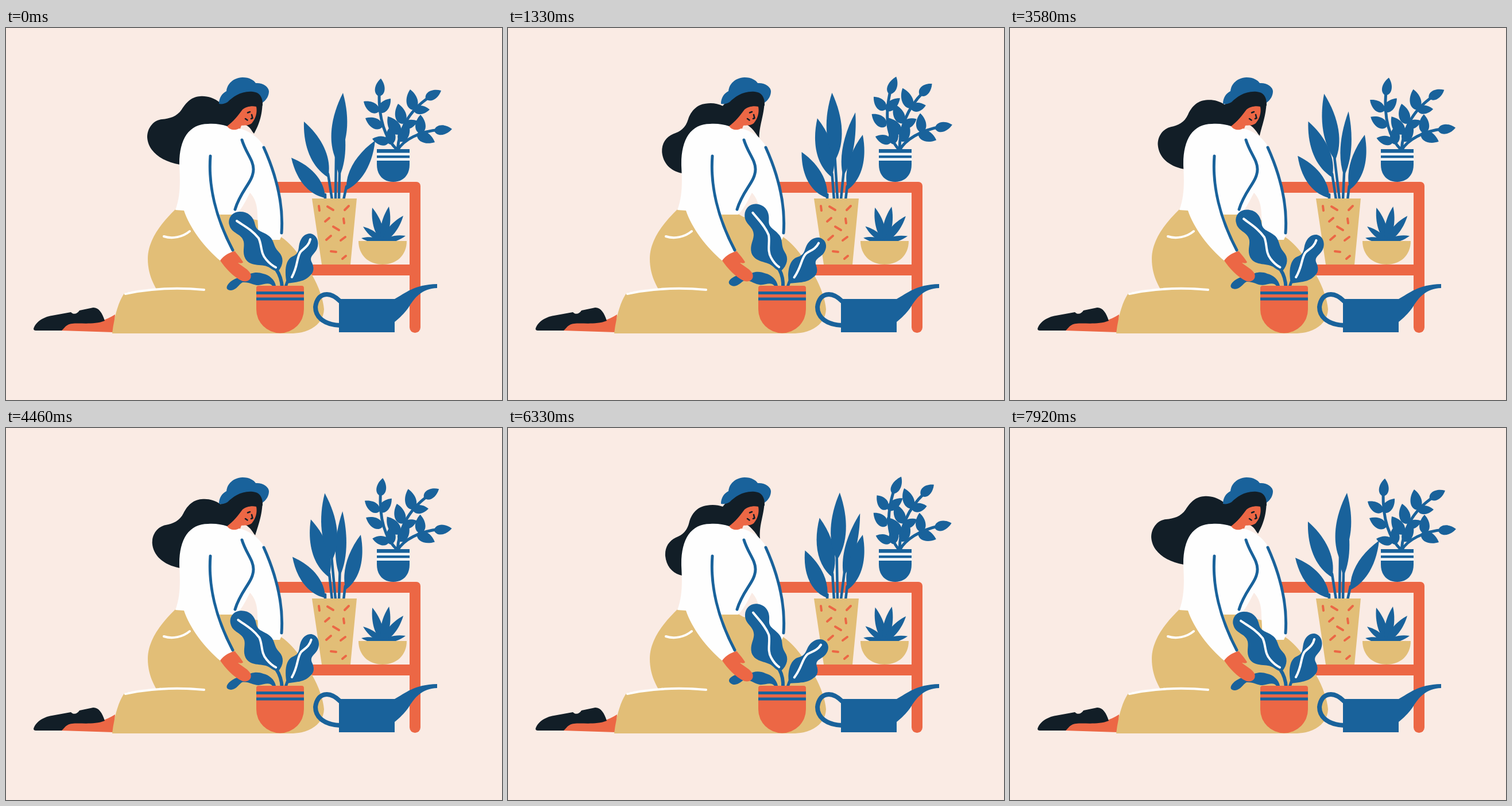
Animation, 864 px wide and 648 px high, one loop 7960 ms. Source, as an HTML page:

```html
<!DOCTYPE html>
<html lang="en">
<head>
<meta charset="utf-8">
<title>Gardener</title>
<style>
  html, body { margin: 0; width: 100%; height: 100%; overflow: hidden; background: #faebe4; }
  svg { display: block; width: 100vw; height: 100vh; }
  .blue { fill: #19629b; }
  .dark { fill: #121e27; }
  .red { fill: #ec6745; }
  .tan { fill: #e2be77; }
  .white { fill: #fefefe; }
  .line { fill: none; stroke-linecap: round; stroke-linejoin: round; }
  .line.blue { stroke: #19629b; }
  .line.white { stroke: #fefefe; }
  .line.red { stroke: #ec6745; }
  .line.dark { stroke: #121e27; }
</style>
</head>
<body>
<svg viewBox="0 0 864 648">
  <!-- shelf -->
  <g class="red">
    <rect x="460" y="268" width="262" height="19" rx="7"/>
    <rect x="500" y="412" width="212" height="19"/>
    <path d="M703 275 H722 V521.5 A9.5 9.5 0 0 1 703 521.5Z"/>
  </g>

  <!-- head -->
  <path id="hair" class="dark"/>
  <path id="lock" class="dark"/>
  <path class="red" d="M384 172 C396 163 404 153 412 142 C418 137 428 135 436 137 C438 147 435 158 428 166 C422 171 414 169 410 170 C408 174 408 178 404 181 H388Z"/>
  <path class="line dark" stroke-width="2.6" d="M421 147.5 L425 146 M428 151 L429.5 157 L427 158 M417 158 L420.5 160.5"/>
  <path class="blue" d="M371 132 C371 122 376 114 384 110 C385 98 395 87 412 86 C424 86 432 91 435 96 C446 95 457 101 458 110 C458 118 454 125 447 130 C446 119 441 112 430 111 C410 109 395 120 386 129 C381 132 376 133 371 132Z"/>

  <!-- legs and skirt -->
  <path class="red" d="M96 527 C102 514 115 512 130 513 C150 515 170 512 190 499 L188 530Z"/>
  <path class="dark" d="M48 524 C51 512 66 503 80 501 L113 495 C118 500 124 498 128 492 L152 487 C162 487 168 497 172 510 C150 519 118 511 108 517 C102 520 100 525 97 527 H52 Q48 527 48 524Z"/>
  <path class="tan" d="M295 316 C270 340 247 370 247 402 C247 425 255 443 262 455 C240 457 222 459 207 461 C196 475 188 505 185 532 H500 C530 531 553 515 554 490 C553 475 545 450 533 430 C515 400 498 375 476 362 L440 335 L410 329 L401 324 L310 316Z"/>
  <path class="line white" stroke-width="4" d="M275 363 C290 368 308 364 320 354 M208 463 C250 454 300 452 345 456"/>

  <!-- blouse -->
  <path class="white" d="M295 317 C305 290 303 262 302 240 C301 195 318 167 352 167 C364 166 376 168 385 171 C390 178 399 179 406 175 C424 179 440 190 450 207 C468 245 481 295 481 320 V360 L477 369 H440 L438 326 C438 308 433 295 425 287 C418 300 413 312 401 325 H372 C378 350 386 370 396 388 L374 406 C345 382 320 348 310 318Z"/>
  <path class="line blue" stroke-width="5" d="M356 223 C352 275 366 332 395 387 M411 195 C418 218 431 230 431 246 C431 268 409 282 399 316 M449 208 C467 248 484 302 480 357"/>

  <!-- shelf plants -->
  <g id="shelfPlants"></g>
  <path class="tan" d="M533 297 H611 L600 412 H550Z"/>
  <path class="line red" stroke-width="4" d="M545 310 l1 8 M560 311 l10 6 M590 317 l7 -7 M556 337 l7 -6 M570 346 l10 6 M588 332 l1 8 M558 369 l8 -7 M583 370 l8 -6 M566 389 l9 1 M586 402 l6 -5"/>
  <path class="tan" d="M614 371 H698 C698 396 680 412 656 412 C632 412 614 396 614 371Z"/>
  <path class="blue" d="M646 211 H703 V238 C703 256 692 268 674.5 268 C657 268 646 256 646 238Z"/>
  <path class="white" d="M646 217.5 h57 v4.5 h-57Z m0 9 h57 v4.5 h-57Z"/>

  <!-- watering can -->
  <path class="blue" d="M580 472 H677 C696 462 710 447 751 446 V453 C724 454 712 470 703 484 C696 495 688 503 677 512 V530 H580Z"/>
  <path class="line blue" stroke-width="8" d="M582 476 C563 457 542 461 539 486 C539 505 556 517 582 518"/>

  <!-- floor plant -->
  <g id="floorPlant"></g>
  <path class="red" d="M373 405 C380 396 390 390 399 389 C402 394 408 399 413 408 C411 411 406 409 404 409 C412 416 422 420 426 428 C429 437 422 443 412 441 C396 434 382 418 373 405Z"/>
  <path class="red" d="M440 449 H515 Q519 449 519 453 V490 A41.5 41.5 0 0 1 436 490 V453 Q436 449 440 449Z"/>
  <path class="blue" d="M436 459 h83 v5 h-83Z m0 10.5 h83 v5 h-83Z"/>
</svg>
<script>
const LOOP = 7960, STEP = 1000 / 24;
const $ = id => document.getElementById(id);

// Swings from pose 0 through the given turning points and back, easing at each
const swing = (...turns) => t => {
  const stops = [[0, 0], ...turns, [LOOP, 0]];
  const i = stops.findIndex(([at]) => at > t);
  const [t0, v0] = stops[i - 1], [t1, v1] = stops[i];
  return v0 + (v1 - v0) * (1 - Math.cos(Math.PI * (t - t0) / (t1 - t0))) / 2;
};

const breeze = swing([2050, 1], [4150, .06], [6350, 1]);
const hairSwing = swing([2000, 1.06], [4170, .28], [6330, 1]);
const twigSwing = swing([1500, 1.05], [3900, .05], [5900, .95]);
const broadSwing = swing([1550, 1.02], [4250, .08], [6400, 1]);
const leftSwing = swing([2300, 1], [3700, 0], [5500, 1]);
const tallSwing = swing([2600, 1]);
const rightSwing = swing([1300, 1], [6350, 1]);

const mix = (a, b, p) => {
  const to = b.match(/[\d.]+/g);
  let i = 0;
  return a.replace(/[\d.]+/g, v => (+v + (to[i++] - v) * p).toFixed(2));
};

// Rotates path points about a root, more strongly towards the far end
function bend(d, [rx, ry], reach, deg, power) {
  return d.replace(/(-?[\d.]+) (-?[\d.]+)/g, (_, px, py) => {
    const x = px - rx, y = py - ry;
    const a = deg * Math.PI / 180 * Math.min(1.15, (Math.hypot(x, y) / reach) ** power);
    const c = Math.cos(a), s = Math.sin(a);
    return (rx + x * c - y * s).toFixed(2) + ' ' + (ry + x * s + y * c).toFixed(2);
  });
}

// Pointed leaf from base to tip; low shapes how quickly it widens
function leaf(bx, by, tx, ty, wide = .36, low = .1) {
  const ux = tx - bx, uy = ty - by;
  const at = (f, side) => (bx + ux * f - uy * wide * side).toFixed(1) + ' ' + (by + uy * f + ux * wide * side).toFixed(1);
  return `M${bx} ${by} C${at(low, 1)} ${at(.62, 1)} ${tx} ${ty} C${at(.62, -1)} ${at(low, -1)} ${bx} ${by}Z`;
}

const movers = [];
function add(parent, move, d, cls, width) {
  const el = document.createElementNS('http://www.w3.org/2000/svg', 'path');
  el.setAttribute('class', cls);
  if (width) el.setAttribute('stroke-width', width);
  $(parent).append(el);
  movers.push({ power: .7, ...move, el, d });
}

// Sword leaves in the tall pot
function sword(by, turn, foot, [bx, by0], [tx, ty], wide) {
  const root = [foot, 297];
  const move = { by, turn, root, reach: Math.hypot(tx - foot, ty - 297), power: .5 };
  add('shelfPlants', move, leaf(bx, by0, tx, ty, wide, .25), 'blue');
  add('shelfPlants', move, `M${bx} ${by0 - 6} L${foot} 299`, 'line blue', 4.5);
}
sword(breeze, 15, 556, [556, 296], [497, 226], .2);
sword(leftSwing, 13.3, 568, [561, 260], [519, 163], .18);
sword(breeze, 11.5, 580, [581, 258], [583, 145], .11);
sword(rightSwing, -13.5, 588, [593, 282], [643, 196], .17);
sword(tallSwing, -13.5, 574, [575, 230], [587, 113], .15);

// Branches: stem plus leaves given as base and tip
function branch(by, turn, reach, stem, leaves) {
  const move = { by, turn, reach, root: [682, 211] };
  add('shelfPlants', move, leaves.map(l => leaf(...l)).join(''), 'blue');
  add('shelfPlants', move, stem, 'line blue', 5);
}
branch(breeze, 14.6, 126, 'M682 213 C660 192 649 160 650 112', [
  [650, 119, 653, 88], [649, 146, 623, 128], [650, 147, 670, 123],
  [655, 173, 626, 157], [667, 199, 638, 193], [670, 203, 670, 171]]);
branch(twigSwing, -10.1, 127, 'M682 213 C684 180 700 145 738 120', [
  [731, 123, 758, 109], [710, 143, 704, 107], [710, 143, 738, 142],
  [691, 167, 683, 132], [685, 185, 665, 154], [691, 172, 717, 162], [686, 198, 702, 168]]);
branch(breeze, -6.2, 99, 'M682 213 C692 195 720 180 756 177', [
  [746, 179, 777, 176], [722, 184, 722, 151], [716, 184, 747, 199]]);

// Succulent
for (const [x, y] of [[638, 313], [667, 311], [692, 327], [622, 346], [696, 362], [619, 366]])
  add('shelfPlants', { by: breeze, turn: 1.5, root: [656, 371], reach: 55 }, leaf(656, 372, x, y, .16, .2), 'blue');

// Floor plant
const held = { by: breeze, turn: 9, root: [466, 449], reach: 81, power: 1.5 };
const small = { by: breeze, turn: 12, root: [489, 449], reach: 98, power: .8 };
const big = { by: broadSwing, turn: 13.5, root: [476, 435], reach: 125, power: .35 };

add('floorPlant', held, 'M470 449 C468 438 458 430 448 428 C438 424 425 426 420 432 C410 432 396 436 388 445 C382 452 384 457 392 457 C402 456 406 446 412 443 C424 442 430 448 440 448 C450 447 458 442 464 449Z', 'blue');
add('floorPlant', small, 'M489 445 C485 425 486 404 499 398 C511 393 509 385 511 376 C514 364 521 358 530 358 C542 360 546 373 542 384 C538 394 528 397 532 407 C537 416 537 425 530 431 C520 442 508 442 489 445Z', 'blue');
add('floorPlant', small, 'M490 442 L487 451', 'line blue', 5);
add('floorPlant', small, 'M530 368 C527 381 518 384 513 390 C506 400 509 414 498 434', 'line white', 4);
add('floorPlant', big, 'M474 424 C484 412 484 399 475 390 C465 380 468 371 459 363 C448 354 437 355 434 343 C431 327 420 319 406 320 C393 321 386 332 389 343 C393 359 410 357 414 372 C416 382 411 390 417 402 C427 418 448 409 460 418 C466 422 470 424 474 424Z', 'blue');
add('floorPlant', big, 'M471 421 Q480 434 481 452', 'line blue', 6);
add('floorPlant', big, 'M402 336 C415 345 428 351 440 366 C446 378 443 392 453 403 C458 409 464 414 470 417', 'line white', 4);

const crown = 'L340 215 L395 182 L420 145 L447 135 L445 112 L400 105Z';
const hair = [
  'M374 131 C362 121 349 118 338 119 C322 120 313 131 306 142 C298 154 285 158 272 159 C258 160 246 173 246 190 C247 213 268 232 303 238' + crown,
  'M374 137 C366 134 356 133 346 135 C330 137 320 149 316 163 C312 180 304 186 292 191 C280 197 273 208 274 223 C276 241 286 253 303 257' + crown
];
const lock = [
  'M436 125 L447 122 C447 150 442 166 432 184 C428 180 426 172 416 168Z',
  'M436 125 L447 122 C447 152 437 166 439 193 C435 190 430 178 416 168Z'
];

function draw(now) {
  const t = Math.floor((now % LOOP + 3.4) / STEP) * STEP % LOOP;
  $('hair').setAttribute('d', mix(...hair, hairSwing(t)));
  $('lock').setAttribute('d', mix(...lock, hairSwing(t)));
  for (const m of movers)
    m.el.setAttribute('d', bend(m.d, m.root, m.reach, m.turn * m.by(t), m.power));
}

const start = performance.now();
function tick() {
  draw(performance.now() - start);
  requestAnimationFrame(tick);
}
tick();
</script>
</body>
</html>
```
